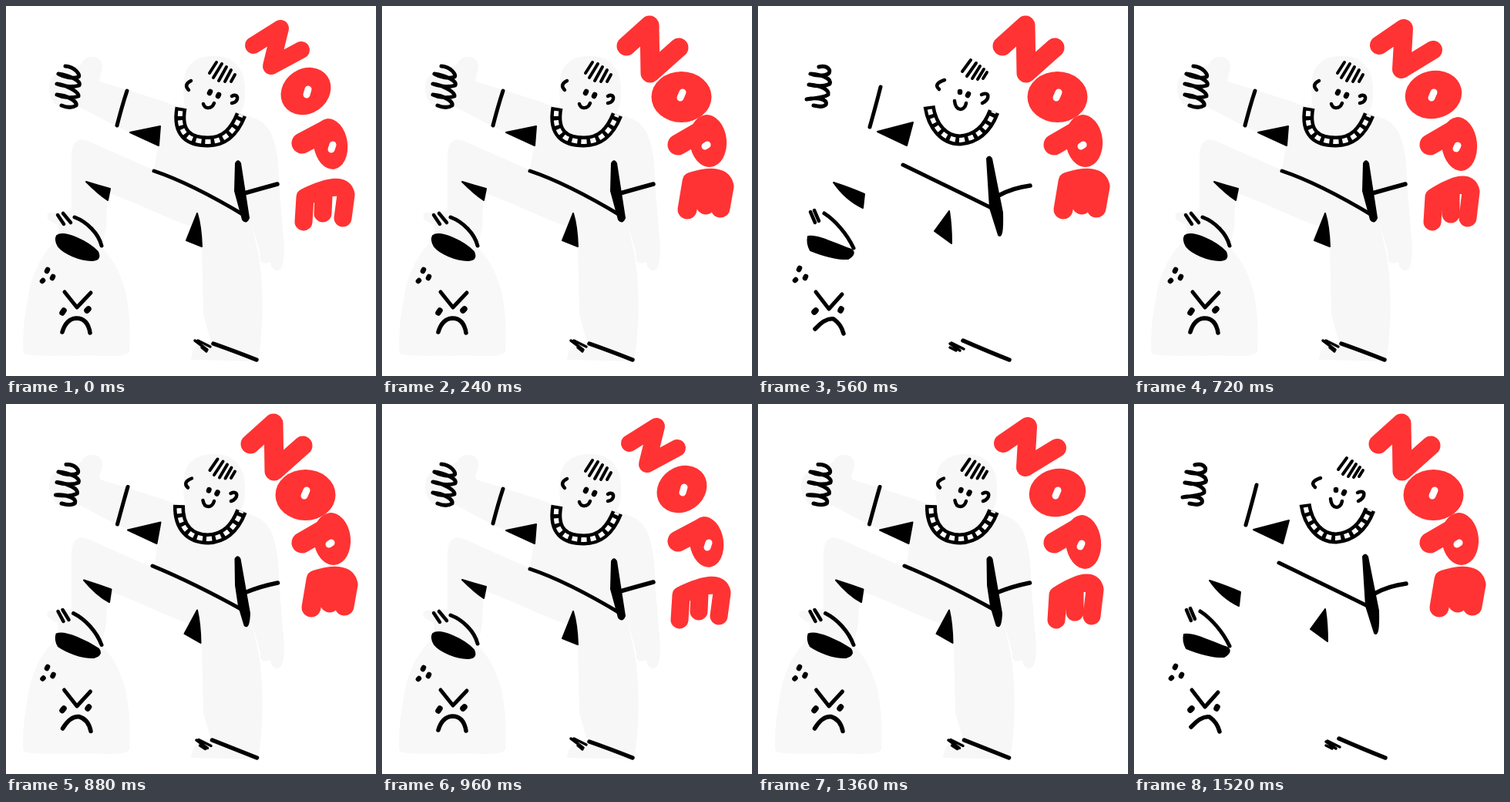
Animation of 480 by 480 pixels, one loop 1600 ms. Source, as an HTML page with a canvas:

```html
<!DOCTYPE html>
<html>
<head>
<meta charset="utf-8">
<style>
  html, body { margin: 0; width: 100%; height: 100%; overflow: hidden; background: #fff; }
  canvas { display: block; }
</style>
</head>
<body>
<canvas id="stage" width="480" height="480"></canvas>
<script>
const ctx = document.getElementById('stage').getContext('2d');
const STEP = 80, STEPS = 20;
const RED = '#ff3333', INK = '#000', PAPER = '#fff';

// A shape is [path, stroke width (0 fills), colour, dash].
const oval = (x, y, rx, ry, turn = 0) => {
  const a = turn * Math.PI / 180, dx = rx * Math.cos(a), dy = rx * Math.sin(a);
  return `M${x - dx} ${y - dy}A${rx} ${ry} ${turn} 1 0 ${x + dx} ${y + dy}A${rx} ${ry} ${turn} 1 0 ${x - dx} ${y - dy}Z`;
};

// Blend two paths that share the same commands.
function mixPath(a, b) {
  const other = b.match(/-?[\d.]+/g);
  let i = 0;
  return a.replace(/-?[\d.]+/g, n => ((+n + +other[i++]) / 2).toFixed(2) + ' ');
}
const mix = (a, b) => a.map(([path, width, ...style], i) =>
  [mixPath(path, b[i][0]), (width + b[i][1]) / 2, ...style]);

const body = [
  ['M85 293C60 300 37 335 30 370C22 410 21 440 23 451C40 456 70 452 90 454C120 452 155 458 160 448C162 420 160 395 155 370C148 345 138 325 120 310Z', 0, '#f8f8f8'],
  ['M58 96C68 78 88 82 98 75C102 63 123 62 125 77C125 86 120 92 122 98L158 109L205 124L224 131L232 130C230 118 230 110 231 98C232 73 250 64 272 65C298 65 311 85 310 110C311 125 307 134 303 141C335 144 345 160 350 185C354 205 354 220 354 232L360 300C362 322 361 343 352 343C346 343 343 337 343 331C335 337 328 333 330 322L318 280L327 320C333 350 336 410 327 461L240 459C242 440 255 434 266 436L256 400L254 311L235 303L240 286C205 274 170 255 132 242L130 285L122 325C95 328 80 310 68 296L67 283C52 280 50 269 58 268L85 266L85 195C85 177 93 170 106 175L192 213L197 181L160 164L143 156L95 131C82 135 70 133 65 129C56 120 54 107 58 96Z', 0, '#f7f7f7']
];

// Each entry: first pose, second pose, width.
const drawing = [
  // raised hand and arm
  ['M77 78C90 79 97 90 94 92C86 95 75 92 68 88C82 90 98 97 95 103C86 106 73 104 66 101C80 103 95 112 94 117C86 120 74 119 66 115C80 116 93 124 91 129C85 133 77 131 72 129',
   'M79 79C90 76 96 84 91 88C86 91 75 91 68 88C82 89 96 94 93 101C86 105 75 104 66 102C80 103 93 108 91 115C85 119 73 120 63 121C78 118 91 121 88 128C84 132 77 130 72 129', 5],
  ['M157 110Q151 128 144 155', 'M159 105Q154 125 145 157', 5],
  ['M161 164L200 156L198 181Z', 'M155 163L201 151L193 181Z', 0],
  // hair, ears, face
  ['M273 73L264 87M280 75L269 93M286 79L276 97M292 83L284 98M297 89L292 98',
   'M276 70L265 85M283 74L271 91M288 78L278 94M293 82L285 95M297 86L292 94', 4],
  ['M240 97Q230 102 237 109M293 117C302 112 303 125 293 126',
   'M242 96Q227 101 235 108M290 115C301 110 301 121 291 126', 4.5],
  ['M265 111L264 113M276 115L275 117', 'M262 111L262 112M273 114L272 116', 6.5],
  ['M256 127C258 134 267 134 270 126', 'M255 123C256 137 268 137 270 126', 4.5],
  // shirt and belt
  ['M192 214C225 225 265 245 310 272', 'M188 206C225 224 265 243 303 262', 5],
  ['M298 204Q301 198 304 204L315 275Q312 283 307 277L303 262L297 240Z',
   'M297 198Q300 193 303 198L317 268Q318 303 312 297L301 262L299 230Z', 0],
  ['M309 243Q330 237 352 231', 'M312 246Q330 236 353 233', 5.5],
  // trouser folds
  ['M104 228Q120 233 135 237L132 252Q120 244 104 228Z', 'M98 229Q120 236 138 244L136 262Q114 252 98 229Z', 0],
  ['M248 269Q253 285 254 312L234 304Z', 'M248 266Q251 285 251 308L229 292Z', 0],
  // shoes
  ['M67 271L75 283M74 269L84 281', 'M68 267L74 281M73 265L79 279', 4.5],
  ['M89 274C105 280 120 295 124 311', 'M86 269C100 278 115 295 124 314', 5],
  ['M66 298C76 291 107 306 119 319Q124 330 111 330C96 330 75 321 68 312Q63 304 66 298Z',
   'M65 299C78 296 107 312 121 316Q128 321 117 328C100 329 83 323 68 317Q63 308 65 299Z', 0],
  ['M269 438Q300 449 325 459', 'M266 434Q298 448 326 459', 5.5],
  ['M245 434L261 446M249 434L265 442M254 443L260 448', 'M249 438L262 447M251 437L267 445M249 443L257 447', 3.5],
  // bag
  ['M54 342L53 344M61 351L60 353M48 356L47 357', 'M54 340L53 342M62 351L61 353M49 355L48 356', 6.5],
  ['M76 371L92 391L110 372', 'M75 371L92 393L109 374', 5],
  ['M75 395L73 398M107 393L105 395', 'M75 395L73 397M108 393L107 395', 7.5],
  ['M73 423Q78 406 91 405Q106 405 109 424', 'M74 419Q88 404 98 406Q108 413 111 425', 5.5]
];
const collars = [
  'M227 132C221 166 238 176 262 176C285 176 297 161 305 141',
  'M222 130C226 157 242 174 262 174C285 172 298 158 306 137'
];
const collar = path => [[path, 15, INK], [path, 6, PAPER, [7, 5]]];
const ink = pose => drawing.map(row => [row[pose], row[2], INK]);
const first = ink(0), second = ink(1);
const people = [
  [...body, ...first, ...collar(collars[0])],
  [...second, ...collar(collars[1])],
  [...body, ...mix(first, second), ...collar(mixPath(...collars))]
];

const word = (n, nWidth, o, oHole, pStem, pBowl, pHole, e, eWidth) => [
  [n, nWidth, RED],
  [oval(...o), 0, RED], [oHole, 9, PAPER],
  [pStem, 27, RED], [oval(...pBowl), 0, RED], [pHole, 9, PAPER],
  [e, eWidth, RED]
];
const low = word('M321 51L356 29L344 78L383 57', 22,
  [389, 110.5, 34, 29, -35], 'M392 108L390 115',
  'M384 178L418 160', [421, 179, 22, 33, -8], 'M424 180L422 186',
  'M386 280L388 248Q438 224 441 245L437 275M412 246L411 269', 23);
const middle = word('M318 51L350 29L347 82L388 57', 24,
  [388.5, 115, 37, 31, -12], 'M389 112L386 119',
  'M384 180L420 159', [422, 179, 23, 35, -6], 'M420 181L418 185',
  'M387 280L389 248Q434 220 437 241L433 275M411 245L411 270', 23);
const high = word('M317 52L347 25L348 87L385 54', 25,
  [388.5, 118, 39, 33, 0], 'M390 112L387 119',
  'M384 180L422 158', [423, 175, 24, 34, -6], 'M422 180L419 182',
  'M396 264L402 228Q440 216 444 234L439 262M420 228L420 258', 25);
const words = [low, middle, mix(middle, high), high];

function paint([path, width, colour, dash = []]) {
  const shape = new Path2D(path);
  ctx.fillStyle = ctx.strokeStyle = colour;
  ctx.lineJoin = 'round';
  ctx.lineCap = dash.length ? 'butt' : width === 15 ? 'butt' : 'round';
  ctx.setLineDash(dash);
  ctx.lineDashOffset = dash.length ? -4 : 0;
  if (!width) ctx.fill(shape);
  // Filled ink keeps soft, brushed corners.
  ctx.lineWidth = width || 2;
  if (width || colour === INK) ctx.stroke(shape);
}

function frame() {
  const step = Math.floor(performance.now() / STEP) % STEPS;
  ctx.fillStyle = PAPER;
  ctx.fillRect(0, 0, 480, 480);
  people[step % people.length].forEach(paint);
  words[step % words.length].forEach(paint);
  requestAnimationFrame(frame);
}
frame();
</script>
</body>
</html>
```
